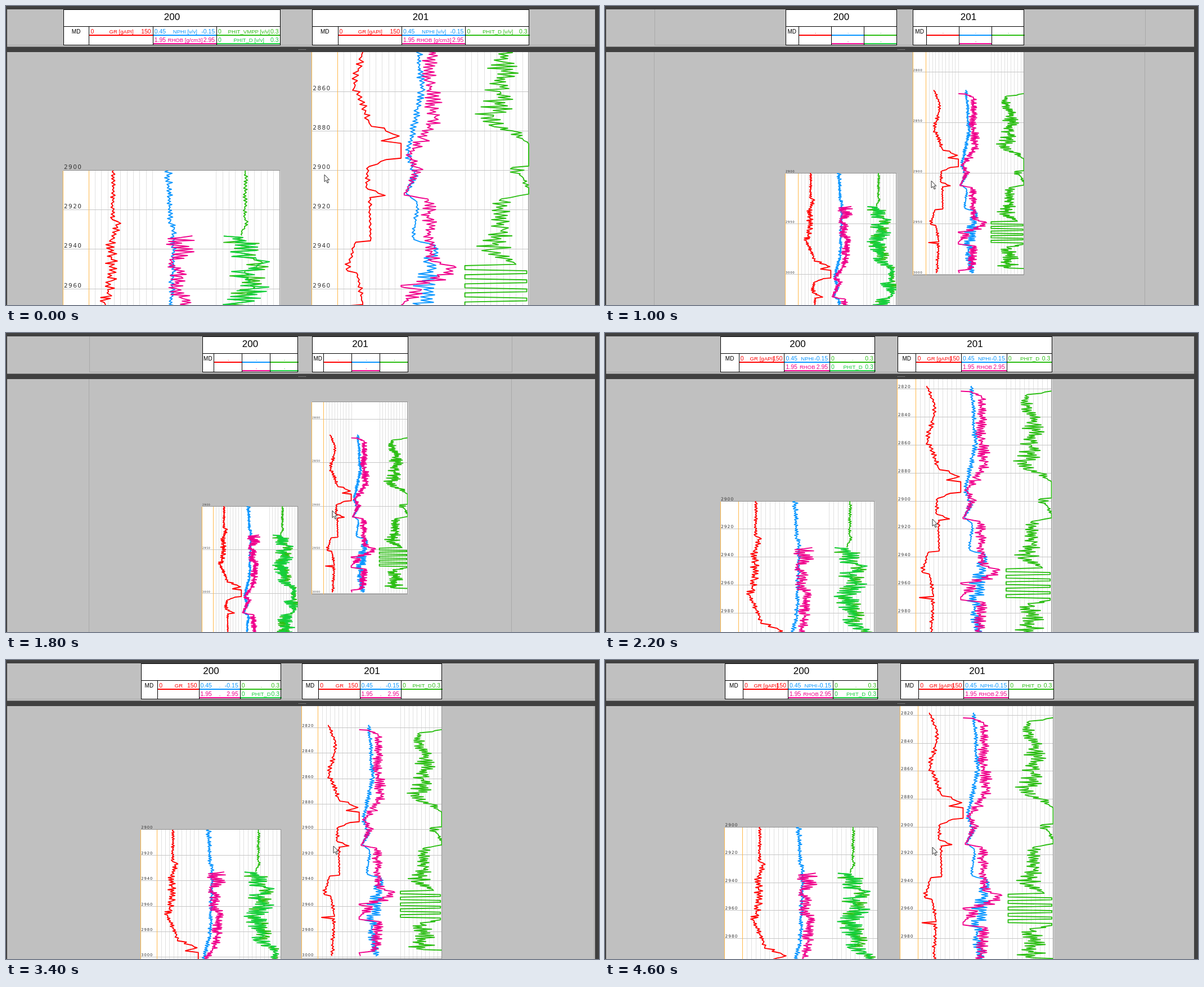
An HTML page for the animation above (5.6 s loop, 1054x532 px).

```html
<!DOCTYPE html>
<html lang="en">
<head>
<meta charset="utf-8">
<title>Well log zoom</title>
<style>
html, body { margin: 0; width: 100%; height: 100%; overflow: hidden; background: #404040; }
svg { display: block; width: 1054px; height: 532px; }
text { font-family: "Liberation Sans", Arial, sans-serif; white-space: pre; }
.depth { font-family: "DejaVu Sans", Verdana, sans-serif; fill: #333; }
.crisp { shape-rendering: crispEdges; fill: none; }
.curve { fill: none; stroke-width: 1.9; stroke-linejoin: round; vector-effect: non-scaling-stroke; }
</style>
</head>
<body>
<svg viewBox="0 0 1054 532">
  <defs>
    <clipPath id="headClip"><rect x="2" y="6" width="1045" height="66.5"/></clipPath>
    <clipPath id="bodyClip"><rect x="2" y="82" width="1045" height="450"/></clipPath>
    <clipPath id="clip200"><rect x="0" y="0" width="110.2" height="240"/></clipPath>
    <clipPath id="clip201"><rect x="0" y="-120" width="110.2" height="221"/></clipPath>
  </defs>
  <rect width="1054" height="532" fill="#404040"/>
  <rect x="2" y="6" width="1045" height="66.5" fill="#c0c0c0"/>
  <rect x="2" y="82" width="1045" height="450" fill="#c0c0c0"/>
  <path class="crisp" d="M520 77.5H533" stroke="#b0b0b0" stroke-dasharray="1 1"/>
  <g id="head" clip-path="url(#headClip)"></g>
  <g id="body" clip-path="url(#bodyClip)"></g>
  <path id="cursor" d="M0 0V12.6L2.9 10L5.1 15L7.2 14.1L5 9.2H8.8Z" fill="#f4f4f4" stroke="#333" stroke-width="1"/>
</svg>
<script>
const LOOP = 5600, BASE = 2900, WIDTH = 110, GAP = 126, SHIFT = 110;
const COLS = [13, 45.3, 77.6], COLW = 32.3;
const RED = '#ff0000', BLUE = '#0a96ff', PINK = '#f0008c', LEAF = '#2cbe14', GREEN = '#16cf3c';

// time, scale, y of depth 2900, cursor x, cursor y, left of well 201 where the page is wider than the view
const steps = [
  [0, 3.51, 292.5, 566, 300, 544],
  [200, 3.51, 292.5, 568, 293, 544],
  [400, 3.193, 293, 569, 299, 546.3],
  [600, 2.4, 295, 570, 306, 550],
  [800, 1.8, 297, 573, 312],
  [1000, 1.8, 297, 580, 311],
  [1200, 1.488, 308, 580, 313],
  [1800, 1.55, 308, 580, 316],
  [2000, 1.876, 305, 581, 324],
  [2200, 2.497, 299, 582, 331, 520],
  [2400, 2.747, 296, 582, 331, 514.3],
  [2600, 3.324, 288.7, 582, 331, 500],
  [2800, 4.424, 275, 582, 331, 472.8],
  [3200, 2.747, 296, 582, 331, 514.3],
  [3400, 2.27, 301.8, 582, 331, 525.7],
  [3600, 1.176, 322, 582, 332],
  [3800, 0.978, 326, 582, 332],
  [4200, 1.862, 306, 582, 333],
  [4600, 2.478, 297, 582, 333, 525]
];

// key points of each trend: depth below 2800, percent of the track, spread of the wiggle
const gr201 = [[18, 25, 4], [30, 42, 4], [40, 40, 7], [58, 27, 8], [76, 50, 10], [80, 76, 8],
  [82.6, 97, 2], [85, 69, 2], [86.3, 100, 0], [93.8, 100, 0], [94.5, 77, 2], [98, 50, 5],
  [108.5, 45, 8], [112.7, 75, 2], [113.8, 51, 4], [135.7, 52, 1], [136.4, 29, 3], [150, 14, 6],
  [153, 32, 6], [168, 40, 2], [168.8, 9, 0], [170, 40, 5], [199, 34, 5]];
const nphi201 = [[18, 24, 5], [60, 32, 6], [92, 11, 6], [102, 22, 6], [112, 9, 3], [116, 25, 6],
  [135, 20, 3], [138, 54, 8], [147, 45, 16], [157, 40, 20], [172, 30, 18], [199, 40, 10]];
const rhob201 = [[21.7, 0, 0], [22.1, 24, 5], [26, 46, 10], [55, 45, 13], [72.6, 54, 15], [84, 35, 13],
  [93, 13, 8], [98.7, 28, 10], [112.5, 5, 3], [114.5, 42, 12], [135, 46, 12], [146, 48, 14],
  [148.5, 83, 5], [157, 45, 30], [158.3, 0, 0], [158.9, 0, 0], [161, 30, 25], [168.4, 0, 0],
  [170.3, 0, 0], [172, 47, 14], [195, 38, 14], [196.5, 0, 0], [199, 3, 0]];
const swings = [0, 1, 2, 3, 4].flatMap(i => {
  const d = 148.3 + 4.6 * i;
  return [[d, 0, 0], [d + 2, 0, 0], [d + 2.6, 97, 0], [d + 4, 97, 0]];
});
const phit201 = [[21.6, 100, 0], [25, 42, 17], [45, 60, 24], [60, 55, 28], [72, 45, 32], [77, 38, 20],
  [80, 75, 18], [86.5, 100, 0], [97.8, 100, 0], [98.5, 75, 18], [104, 92, 12], [109.6, 100, 0],
  [112, 100, 0], [114.5, 57, 18], [130, 60, 20], [140, 42, 30], [147.6, 80, 10],
  ...swings, [174, 50, 30], [194, 55, 36], [194.5, 100, 0]];

const gr200 = [[100, 39, 3], [125, 38, 4], [126, 46, 6], [135, 36, 10], [156, 36, 10], [167, 25, 8], [183, 47, 3]];
const nphi200 = [[100, 25, 7], [126, 28, 6], [130, 34, 5], [183, 29, 6]];
const rhob200 = [[133.2, 63, 0], [134, 45, 22], [142, 45, 24], [146, 30, 9], [154, 46, 17], [160, 38, 14],
  [165, 48, 16], [183, 45, 12]];
const vmpp200 = [[100, 46, 4], [125, 45, 3], [126, 50, 3], [131, 40, 2], [133, 40, 2]];
const phit200 = [[133.3, 12, 0], [134, 42, 34], [142, 42, 38], [147, 74, 22], [152, 45, 30], [160, 58, 27],
  [167, 40, 32], [183, 60, 28]];

// the deeper beds of well 200 repeat those of well 201
const deepen = (keys, cap = 100, extra = 0) => keys.filter(k => k[0] > 74)
  .map(([d, v, spread]) => [d + SHIFT, Math.min(cap, v), spread + extra]);

function random(seed) {
  return () => {
    seed = (seed * 1664525 + 1013904223) >>> 0;
    return seed / 4294967296;
  };
}

// joins the key points and swings to either side of the trend between them
function curve(color, col, keys, gap, seed) {
  const rnd = random(seed), pts = [];
  const put = (d, v) => pts.push(
    (COLS[col] + COLW * Math.max(0, Math.min(100, v)) / 100).toFixed(2) + ' ' + (d - 100).toFixed(2));
  let side = 1;
  keys.forEach(([d, v, a], i) => {
    put(d, v);
    if (i === keys.length - 1) return;
    const [d2, v2, a2] = keys[i + 1];
    const n = a + a2 ? Math.round((d2 - d) / gap) : 1;
    for (let k = 1; k < n; k++) {
      const f = (k + (rnd() - 0.5) * 0.6) / n;
      side = -side;
      put(d + (d2 - d) * f, v + (v2 - v) * f + side * (a + (a2 - a) * f) * rnd());
    }
  });
  return `<path class="curve" stroke="${color}" d="M${pts.join('L')}"/>`;
}

const deepPhit = phit200.concat(deepen(phit201, 86, 10));
const axis = (col, row, color, lo, hi, name) => ({ col, row, color, lo, hi, name });
const common = [
  axis(0, 0, RED, '0', '150', 'GR [gAPI]'),
  axis(1, 0, BLUE, '0.45', '-0.15', 'NPHI [v/v]'),
  axis(1, 1, PINK, '1.95', '2.95', 'RHOB [g/cm3]')
];
const wells = [
  {
    name: '200', top: 2900, end: 3140, offset: -GAP,
    axes: [...common, axis(2, 0, LEAF, '0', '0.3', 'PHIT_VMPP [v/v]'), axis(2, 1, GREEN, '0', '0.3', 'PHIT_D [v/v]')],
    curves: curve(RED, 0, gr200.concat(deepen(gr201)), 0.9, 3) +
      curve(BLUE, 1, nphi200.concat(deepen(nphi201)), 0.8, 5) +
      curve(PINK, 1, rhob200.concat(deepen(rhob201)), 0.7, 7) +
      curve(LEAF, 2, vmpp200, 0.8, 9) +
      curve(LEAF, 2, deepPhit, 0.8, 11) +
      curve(GREEN, 2, deepPhit, 0.8, 13)
  },
  {
    name: '201', top: 2780, end: 3001, offset: 0,
    axes: [...common, axis(2, 0, LEAF, '0', '0.3', 'PHIT_D [v/v]')],
    curves: curve(RED, 0, gr201, 1.2, 21) +
      curve(BLUE, 1, nphi201, 0.9, 23) +
      curve(PINK, 1, rhob201, 0.8, 25) +
      curve(LEAF, 2, phit201, 0.8, 27)
  }
];

const pen = document.createElement('canvas').getContext('2d');
function measure(str, size) {
  pen.font = size + 'px "Liberation Sans", Arial, sans-serif';
  return pen.measureText(str).width;
}
const text = (x, y, str, size, fill, anchor = 'start', extra = '') =>
  `<text x="${x.toFixed(1)}" y="${y}" font-size="${size}" fill="${fill}" text-anchor="${anchor}" ${extra}>${str}</text>`;
const line = (d, color, width = 1) =>
  `<path class="crisp" d="${d}" stroke="${color}" stroke-width="${width}"/>`;
const snap = v => Math.round(v) + 0.5;
const snapY = v => Math.floor(v) + 0.5;

function axisLabel(a, left, s) {
  const x = left + COLS[a.col] * s, w = COLW * s;
  const y = a.row ? 64 : 48.5, wide = w > 70;
  let name = '.';
  if (wide) {
    const room = w - measure(a.lo, 10.5) - measure(a.hi, 10.5) - 9;
    name = [a.name, a.name.split(' ')[0]].find(n => measure(n, 9.6) <= room) || '.';
  }
  let out = line(`M${snap(x)} ${a.row ? 67 : 52}H${snap(x + w)}`, a.color, 2);
  if (wide) out += text(x + 3, y, a.lo, 10.5, a.color) + text(x + w - 3, y, a.hi, 10.5, a.color, 'end');
  return out + text(x + w / 2 + 1, y, name, 9.6, a.color, 'middle');
}

function header(well, left, s) {
  const l = snap(left), r = snap(left + WIDTH * s) - 1, md = COLS[0] * s;
  const size = Math.min(10, md * 0.62);
  let out = `<rect class="crisp" x="${l}" y="6.5" width="${r - l}" height="63" style="fill:#fff"/>`;
  out += text((l + r) / 2, 25, well.name, 17, '#000', 'middle');
  out += text(left + md / 2, 49, 'MD', size.toFixed(1), '#000', 'middle', size < 9 ? 'font-weight="bold"' : '');
  out += well.axes.map(a => axisLabel(a, left, s)).join('');
  let rules = `M${l} 6.5H${r}V69.5H${l}ZM${l} 36.5H${r}`;
  for (const c of COLS) rules += `M${snap(left + c * s)} 36.5V69.5`;
  return out + line(rules, '#000');
}

function panel(well, headLeft, zero, s) {
  const left = headLeft - 0.8, yOf = d => zero + (d - BASE) * s;
  const l = snap(left), r = snap(left + 109.7 * s), t = snapY(yOf(well.top)), b = snapY(yOf(well.end));
  const gap = s > 4 ? 10 : s > 2.1 ? 20 : 50;
  let out = `<rect class="crisp" x="${l}" y="${t}" width="${r - l}" height="${b - t}" style="fill:#fff"/>`;
  let cols = '', rows = '', labels = '';
  for (const c of [0, 2])
    for (let i = 0; i <= 10; i++) cols += `M${snap(left + (COLS[c] + COLW * i / 10) * s)} ${t}V${b}`;
  for (let d = Math.ceil(well.top / gap) * gap; d <= well.end; d += gap) {
    if (d === well.top && d !== BASE) continue;
    const y = snapY(yOf(d));
    rows += `M${l} ${y}H${r}`;
    labels += `<text class="depth" x="${(left + 0.6 * s).toFixed(1)}" y="${(y - 0.8 * s).toFixed(1)}" ` +
      `font-size="${(3 * s).toFixed(2)}" letter-spacing="${(0.4 * s).toFixed(2)}">${d}</text>`;
  }
  out += line(cols, '#e0e0e0') + line(rows, '#c6c6c6');
  out += line(`M${l} ${t}H${r}V${b}H${l}`, '#909090');
  out += line(`M${l} ${t}V${b}M${snap(left + COLS[0] * s)} ${t}V${b}`, '#ffb84a');
  out += `<g transform="translate(${left} ${zero}) scale(${s})" clip-path="url(#clip${well.name})">${well.curves}</g>`;
  return out + labels;
}

const head = document.getElementById('head');
const body = document.getElementById('body');
const cursor = document.getElementById('cursor');

// a page that fits is centred
function draw([, s, zero, cx, cy, left = 524 + 13 * s]) {
  const pl = snap(left - 255.3 * s), pr = snap(left + 229.2 * s), top = snapY(zero - 170.8 * s);
  const each = fn => wells.map(w => fn(w, left + w.offset * s)).join('');
  head.innerHTML = line(`M${pl} 0V69.5H${pr}V0`, '#a9a9a9') + each((w, x) => header(w, x, s));
  body.innerHTML = line(`M${pl - 1} 600V${top}H${pr - 1}V600`, '#a9a9a9') + each((w, x) => panel(w, x, zero, s));
  cursor.setAttribute('transform', `translate(${cx} ${cy})`);
}

const start = performance.now();
let shown = null;
function tick() {
  const t = (performance.now() - start) % LOOP;
  const step = steps.filter(k => k[0] <= t).pop();
  if (step !== shown) draw(shown = step);
  requestAnimationFrame(tick);
}
tick();
</script>
</body>
</html>
```
